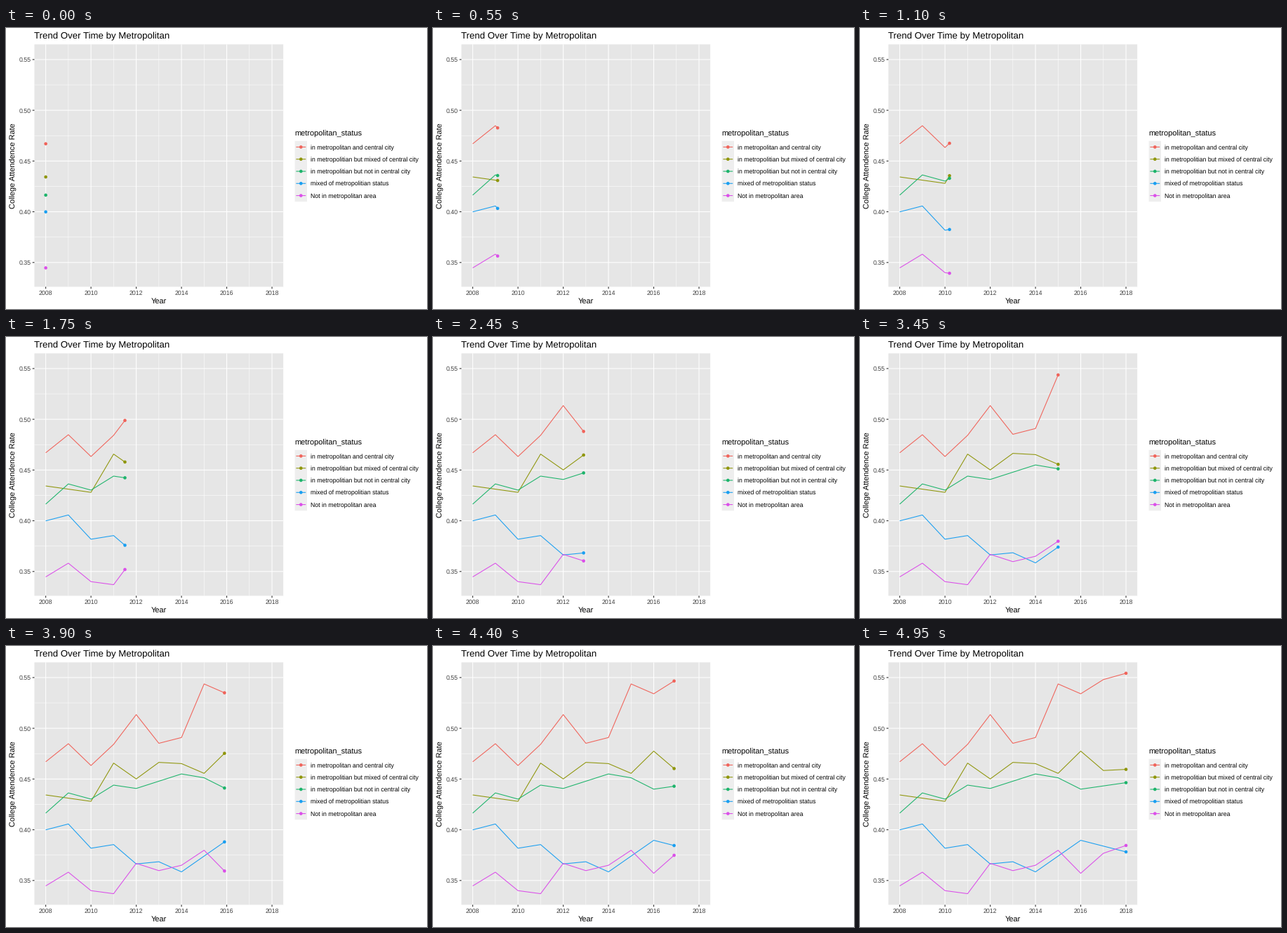
These frames come from a looping animation (600x400 px, 5000 ms). A matplotlib script:

```python
import numpy as np
import matplotlib.pyplot as plt
from matplotlib.animation import FuncAnimation
from matplotlib.patches import Circle, Rectangle

plt.rcParams["font.family"] = ["Liberation Sans"]
plt.rcParams["text.hinting"] = "none"

W, H, DPI = 600, 400, 100
PX = 72 / DPI  # points per pixel
FRAMES, INTERVAL = 100, 50

LEFT, RIGHT, TOP, BOTTOM = 40.5, 395.2, 23.3, 368.4
MID_X, MID_Y = (LEFT + RIGHT) / 2, (TOP + BOTTOM) / 2
THICK, THIN, TICK_LEN, RADIUS = 1.07, 0.53, 2.75, 2.3
TITLE, HEADING, SMALL = 13.2, 11, 8.8
PANEL, KEY, TICK, TICK_TEXT = "#e6e6e6", "#eeeeee", "#262626", "#404040"

# Rates per thousand at the bends, one per year; gaps lie on a straight line.
YEARS = np.arange(2008, 2019)
GAP = np.nan
SERIES = [
    ("in metropolitan and central city", "#f0635a",
     [467, 484.8, 463.3, 484.2, 513.5, 485.2, 490.9, 543.7, 534, 548, 554.2]),
    ("in metropolitian but mixed of central city", "#8f960b",
     [434.3, GAP, 428, 465.7, 450.1, 466.4, 465.2, 455.6, 477.5, 458.4, 459.5]),
    ("in metropolitian but not in central city", "#1db46b",
     [416.4, 436.3, 430.2, 444, 440.7, GAP, 455, 451.2, 440, GAP, 446.4]),
    ("mixed of metropolitian status", "#1a9ff1",
     [399.9, 405.7, 381.8, 385.4, 366.3, 368.5, 358.5, GAP, 389.6, GAP, 378.2]),
    ("Not in metropolitan area", "#db4fe9",
     [344.7, 358.2, 340, 337, 366.9, 359.7, 365, 379.8, 357.1, 376.8, 384.5]),
]

fig = plt.figure(figsize=(W / DPI, H / DPI), dpi=DPI, facecolor="white")
ax = fig.add_axes([0, 0, 1, 1])
ax.set_xlim(0, W)
ax.set_ylim(H, 0)
ax.axis("off")


def x_px(year):
    return LEFT + (year - 2007.5) * (RIGHT - LEFT) / 11


def y_px(rate):
    return 44.9 + (0.55 - rate) * 1444.5


def bends(values):
    """Fill the gaps and return pixel heights, one per year."""
    values = np.array(values)
    known = ~np.isnan(values)
    return y_px(np.interp(YEARS, YEARS[known], values[known]) / 1000)


def line(xs, ys, color, width=THICK, z=2):
    return ax.plot(xs, ys, color=color, lw=width * PX, zorder=z, snap=False,
                   solid_capstyle="butt", solid_joinstyle="round")[0]


def dot(x, y, color):
    return ax.add_patch(Circle((x, y), RADIUS, fc=color, lw=0, zorder=6,
                               snap=False))


def box(x, y, w, h, color):
    ax.add_patch(Rectangle((x, y), w, h, fc=color, lw=0, zorder=1, snap=False))


def label(x, y, text, size, color="black", **kw):
    ax.text(x, y, text, fontsize=size * PX, color=color, va="baseline", **kw)


def draw_panel():
    box(LEFT, TOP, RIGHT - LEFT, BOTTOM - TOP, PANEL)
    for i, year in enumerate(YEARS):
        x, major = x_px(year), i % 2 == 0
        line([x, x], [TOP, BOTTOM], "white", THICK if major else THIN)
        if major:
            line([x, x], [BOTTOM, BOTTOM + TICK_LEN], TICK)
            label(x, 380, str(year), SMALL, TICK_TEXT, ha="center")
    for i in range(9):
        rate = 0.35 + 0.025 * i
        y, major = y_px(rate), i % 2 == 0
        line([LEFT, RIGHT], [y, y], "white", THICK if major else THIN)
        if major:
            line([LEFT - TICK_LEN, LEFT], [y, y], TICK)
            label(LEFT - 4.9, y + 3.4, f"{rate:.2f}", SMALL, TICK_TEXT,
                  ha="right")
    label(LEFT, 15, "Trend Over Time by Metropolitan", TITLE)
    label(MID_X, 392, "Year", HEADING, ha="center")
    label(14, MID_Y, "College Attendence Rate", HEADING, ha="center",
          rotation=90, rotation_mode="anchor")


def draw_legend():
    x, top, size = 411.7, 160.8, 17.28
    label(x, top - 7, "metropolitan_status", HEADING)
    box(x, top, size, size * len(SERIES), KEY)
    for i, (name, color, _) in enumerate(SERIES):
        y = top + size * (i + 0.5)
        line([x + 0.1 * size, x + 0.9 * size], [y, y], color, z=5)
        dot(x + size / 2, y, color)
        label(x + size + 5.5, y + 3.2, name, SMALL)


draw_panel()
draw_legend()
paths = [bends(values) for _, _, values in SERIES]
trails = [line([], [], color, z=5) for _, color, _ in SERIES]
heads = [dot(0, 0, color) for _, color, _ in SERIES]


def update(frame):
    # The reveal advances in tenths of a year.
    now = YEARS[0] + round(10 * frame / (FRAMES - 1), 1)
    past = YEARS < now
    xs = x_px(np.append(YEARS[past], now))
    for path, trail, head in zip(paths, trails, heads):
        y = np.interp(now, YEARS, path)
        trail.set_data(xs, np.append(path[past], y))
        head.center = xs[-1], y
    return trails + heads


anim = FuncAnimation(fig, update, frames=FRAMES, interval=INTERVAL,
                     repeat=True, repeat_delay=0)
plt.show()
```
